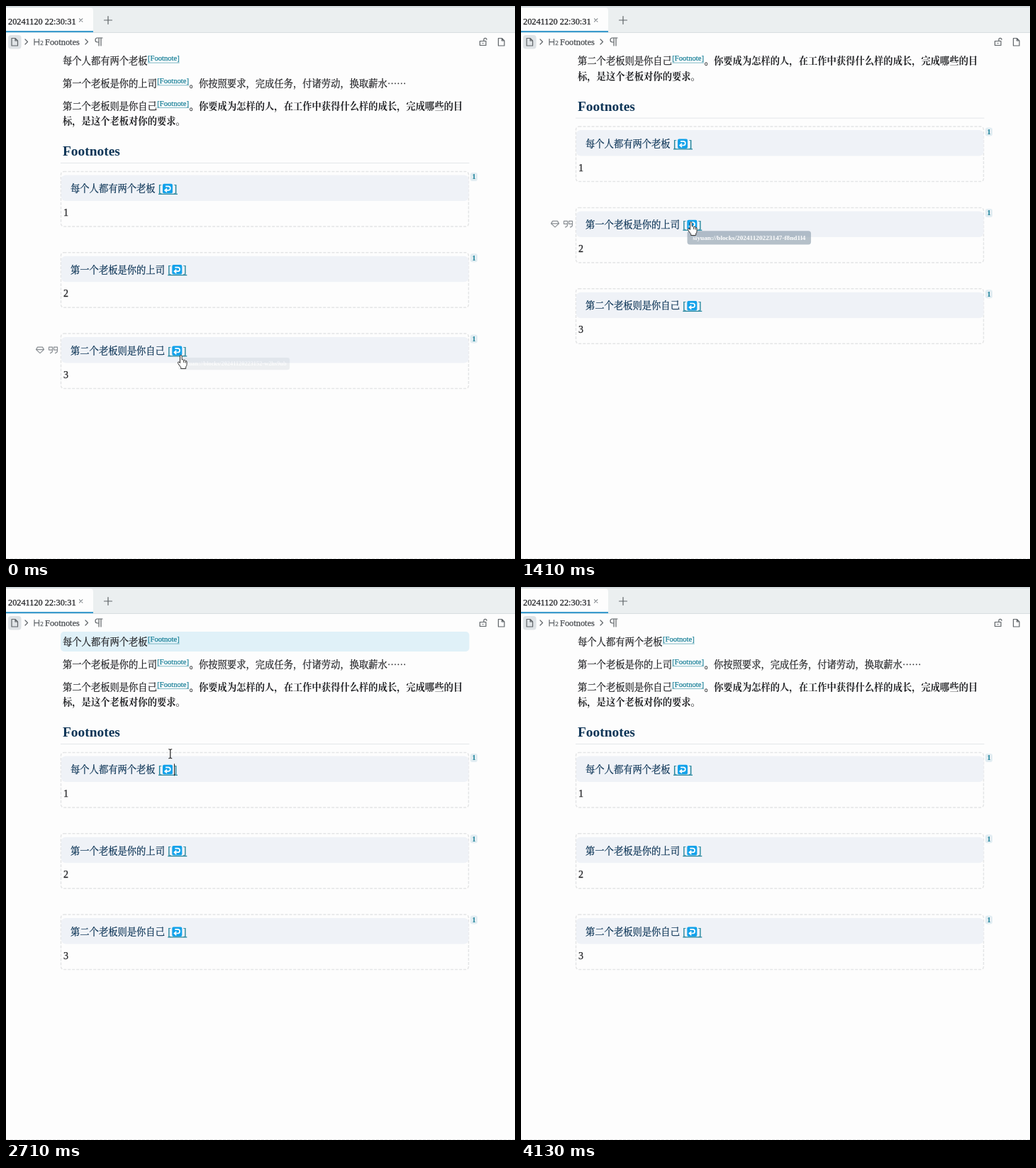
Recreate the animation shown at these times as an HTML page. Size 718 by 780 pixels, loop 4.2 s.

```html
<!DOCTYPE html>
<html lang="zh-CN">
<head>
<meta charset="utf-8">
<style>
html, body { margin: 0; width: 100%; height: 100%; overflow: hidden; background: #fdfdfd; }
svg { display: block; }
text { font-family: "Liberation Serif", "Noto Sans CJK SC", "Noto Sans CJK", serif; white-space: pre; stroke-width: .25; }
.zh { font-family: "Noto Serif CJK SC", "Noto Sans CJK SC", "Noto Sans CJK", sans-serif; font-size: 13.3px; }
.bold { font-weight: 700; stroke-width: 0; }
.line { fill: none; stroke: #5f6468; stroke-width: 1.2; stroke-linejoin: round; stroke-linecap: round; }
.soft { stroke: #8a8f94; }
.dash { fill: none; stroke: #e4e5e6; stroke-width: 1.5; stroke-dasharray: 4 2; }
</style>
</head>
<body>
<svg id="stage" width="718" height="780" viewBox="0 0 718 780"></svg>
<script>
const LOOP = 4200, ADV = 13.3, STEP = 31.7;
const INK = '#202124', NAVY = '#0d3557', TEAL = '#1b8199';
const titles = ['每个人都有两个老板', '第一个老板是你的上司', '第二个老板则是你自己'];
const ids = ['20241120223138-k4vqz7e', '20241120223147-f8nd1l4', '20241120223152-w2hs9ub'];
const paraY = i => 77.3 + STEP * i;
const cardY = i => 257.3 + i * 114.3;
const linkX = i => 95.3 + titles[i].length * ADV;

// Small builders; y is the optical middle of the text.
const zh = (x, y, s, fill = INK, cls = '') =>
  `<text class="zh ${cls}" x="${x}" y="${y + 5}" fill="${fill}" stroke="${fill}">${s}</text>`;
const latin = (x, y, size, s, fill = INK, more = '') =>
  `<text x="${x}" y="${y + size * .33}" font-size="${size}" fill="${fill}" stroke="${fill}" ${more}>${s}</text>`;
const rect = (x, y, w, h, fill, r = 0, more = '') =>
  `<rect x="${x}" y="${y}" width="${w}" height="${h}" rx="${r}" fill="${fill}" ${more}/>`;
const path = (d, more = 'class="line"') => `<path d="${d}" ${more}/>`;
const group = (id, body) => `<g id="${id}">${body}</g>`;

const page = x => path(`M${x - 4} 45.5h5l3.5 3.5v7h-8.5zM${x + 1} 45.5v3.5h3.5`);
const chevron = x => path(`M${x - 2} 47l3.5 3.5l-3.5 3.5`);
const pilcrow = (x, y, cls = '') =>
  path(`M${x + 5} ${y - 5}h-7a3 3 0 0 0 0 6h2M${x} ${y - 5}v11M${x + 3} ${y - 5}v11`, `class="line ${cls}"`);

function paragraph(i, rest) {
  const y = paraY(i), x = 80 + titles[i].length * ADV;
  return zh(80, y, titles[i]) + latin(x + .3, y - 3.3, 10.6, '[Footnote]', TEAL) +
    rect(x + .3, y + 2.3, 44.7, 1, '#7fb9c6') + zh(x + 45.7, y, rest);
}

function card(title, i) {
  const y = cardY(i), x = linkX(i);
  return `<rect class="dash" x="77.5" y="${y - 23.8}" width="575" height="77.5" rx="4"/>` +
    rect(78, y - 18.8, 574.5, 36.5, '#eff2f7', 6) +
    zh(91, y, title, NAVY) +
    latin(x, y, 14, '[', TEAL) + latin(x + 21.5, y, 14, ']', TEAL) +
    rect(x + 6, y - 6.5, 14, 13.5, '#13a2ea', 2) +
    path(`M${x + 10} ${y - 3}h4a2.8 2.8 0 0 1 0 5.6h-4M${x + 12} ${y}l-2.8 2.6l2.8 2.6`,
      'fill="none" stroke="#fff" stroke-width="1.7"') +
    rect(x, y + 7.4, 27, 1.2, TEAL) +
    latin(81, y + 34.2, 14, i + 1) +
    rect(655, y - 22.3, 10, 12, '#e2edf2', 3) +
    latin(657.5, y - 16.3, 10.5, '1', TEAL, 'class="bold"');
}

const quote = x => `M${x + 5} 0h-5v-4h5v5q0 3 -3 3.5`;
const hoverIcons =
  path(`M44.5 -4h7l2 3.5h-11zM42.5 -.5l5.5 5l5.5 -5${quote(60.5)}${quote(67.5)}`, 'class="line soft"');

const beam = path('M-2.5 -6.5q2 0 2.5 1q.5 -1 2.5 -1M0 -5.5v11M-2.5 6.5q2 0 2.5 -1q.5 1 2.5 1',
  'fill="none" stroke="#222" stroke-width="1.2"');
const hand = path('M-1.5 1q0 -1.5 1.3 -1.5t1.3 1.5v5q2 -1 2.6 .6q2 -.8 2.4 .8q2 -.4 2 1.6v3.5q0 2 -1.4 3.5v2.5h-7v-2q-2 -2 -4.3 -6q0 -2 1.7 -1.4l1.4 1.5zM3.7 7v3M6.1 8v2.5',
  'fill="#fff" stroke="#333" stroke-linejoin="round"');

const chrome =
  rect(0, 0, 718, 38, '#ebeff0') + rect(0, 0, 718, 2, '#d3dadd') + rect(0, 37, 718, 1, '#d8dee1') +
  path('M0 2.5h119q4 0 4 4v31h-123z', 'fill="#fdfdfd"') + rect(0, 35, 123, 2.2, '#3c9bcd') +
  latin(3, 21.5, 12.3, '20241120 22:30:31') +
  path('M103.5 17.8l4.4 4.4m0 -4.4l-4.4 4.4', 'class="line soft"') + path('M144 14.5v11M138.5 20h11') +
  rect(3, 41, 18.5, 19.5, '#dfe3e6', 4) + page(12) + chevron(29) +
  path('M40 46.5v8.5M46.5 46.5v8.5M40 50.7h6.5') + latin(48.3, 52, 9, '2', '#5f6468') +
  latin(55, 51, 12.4, 'Footnotes', '#45494d') + chevron(114) + pilcrow(131, 50) +
  path('M668.5 49.5h8.5v6h-8.5zM674 49.5v-2.2a2 2 0 0 1 4 0M672.8 52v1') + page(698.5) +
  '<path class="dash" d="M0 779.5H718" style="stroke-width:1"/>';

const doc =
  rect(77, 0, 576.5, 0, '#e0f1f8', 5, 'id="mark"') +
  paragraph(0, '') +
  paragraph(1, '。你按照要求，完成任务，付诸劳动，换取薪水……') +
  paragraph(2, '。') +
  zh(272, paraY(2), '你要成为怎样的人，在工作中获得什么样的成长，完成哪些的目', INK, 'bold') +
  zh(80, paraY(2) + 21.7, '标，是这个老板对你的要求。', INK, 'bold') +
  latin(80, 205, 19.4, 'Footnotes', NAVY, 'class="bold"') +
  rect(77, 221, 576.5, 1, '#e4e7ea') +
  titles.map(card).join('') +
  rect(0, -8, 1, 17, '#222', 0, 'id="caret"') +
  group('hover', hoverIcons) +
  group('para', pilcrow(68, 302, 'soft'));

const tip = rect(-95, -10.5, 190, 21, '#8497a7', 4) +
  latin(0, 0, 10.1, '', '#fff', 'id="tipText" class="bold" text-anchor="middle"');

const $ = id => document.getElementById(id);
$('stage').innerHTML =
  '<clipPath id="view"><rect y="62" width="718" height="716"/></clipPath>' +
  `<g clip-path="url(#view)">${group('doc', doc)}</g>` + chrome + group('tip', tip) +
  group('cursor', '<circle id="press" r="10" fill="#f4ea1c" opacity=".65"/>' +
    group('beam', beam) + group('hand', hand));

// The pointer visits the links from last to first; each click jumps to the paragraph.
const visits = [{ card: 2, end: 350 }, { card: 1, end: 1690 }, { card: 0, end: 2710 }];
const passing = { card: 2, end: 1010, lead: 200 };
const LEAD = 368, PRESS = 100, MARK = 1030, BLINK = 530, FADE = 150;
const moves = [[350, 247, 493], [420, 243, 483], [630, 243, 483], [990, 246, 397], [1340, 240, 305],
  [1690, 240, 305], [2160, 237, 237], [3110, 228, 234], [3380, 228, 234], [3830, 14, 292]];

const show = (id, on) => $(id).style.display = on ? '' : 'none';
const place = (id, x, y, scale = 1) =>
  $(id).setAttribute('transform', `translate(${x} ${y}) scale(${scale})`);

function pointer(t) {
  const n = moves.findIndex(m => m[0] > t);
  if (n < 0) return null;
  const b = moves[n], a = moves[n - 1] || b, k = (t - a[0]) / (b[0] - a[0] || 1);
  return [1, 2].map(j => a[j] + (b[j] - a[j]) * k);
}

function draw(t) {
  const last = visits.findLast(v => t >= v.end);
  const scroll = last ? STEP * last.card : 0;
  const since = last ? t - last.end : Infinity;
  place('doc', 0, -scroll);

  show('mark', since < MARK);
  show('caret', since < BLINK);
  if (last) {
    const i = last.card;
    $('mark').setAttribute('y', paraY(i) - 14.3);
    $('mark').setAttribute('height', i === 2 ? 49.5 : 28);
    place('caret', linkX(i) + (i === 1 ? 4 : 22), cardY(i));
  }

  const over = [...visits, passing].find(v => t < v.end && t >= v.end - (v.lead || LEAD));
  const pressed = over && over !== passing && over.end - t < PRESS;
  show('hover', over);
  show('tip', over);
  show('para', t >= 1990 && t < 2230);
  if (over) {
    const i = over.card, p = Math.min(1, (t - over.end + (over.lead || LEAD)) / FADE);
    place('hover', 0, cardY(i) - .8);
    place('tip', linkX(i) + 93.5, cardY(i) - scroll + 18.7, .8 + .2 * p);
    $('tip').style.opacity = over === passing ? p * (over.end - t) / over.lead : p;
    $('tipText').textContent = 'siyuan://blocks/' + ids[i];
  }

  const pos = pointer(t), pointing = over && over !== passing && !pressed;
  show('cursor', pos);
  if (pos) place('cursor', ...pos);
  show('hand', pointing);
  show('beam', !pointing);
  show('press', pressed);
}

const start = performance.now();
function tick() {
  draw((performance.now() - start) % LOOP);
  requestAnimationFrame(tick);
}
tick();
</script>
</body>
</html>
```
